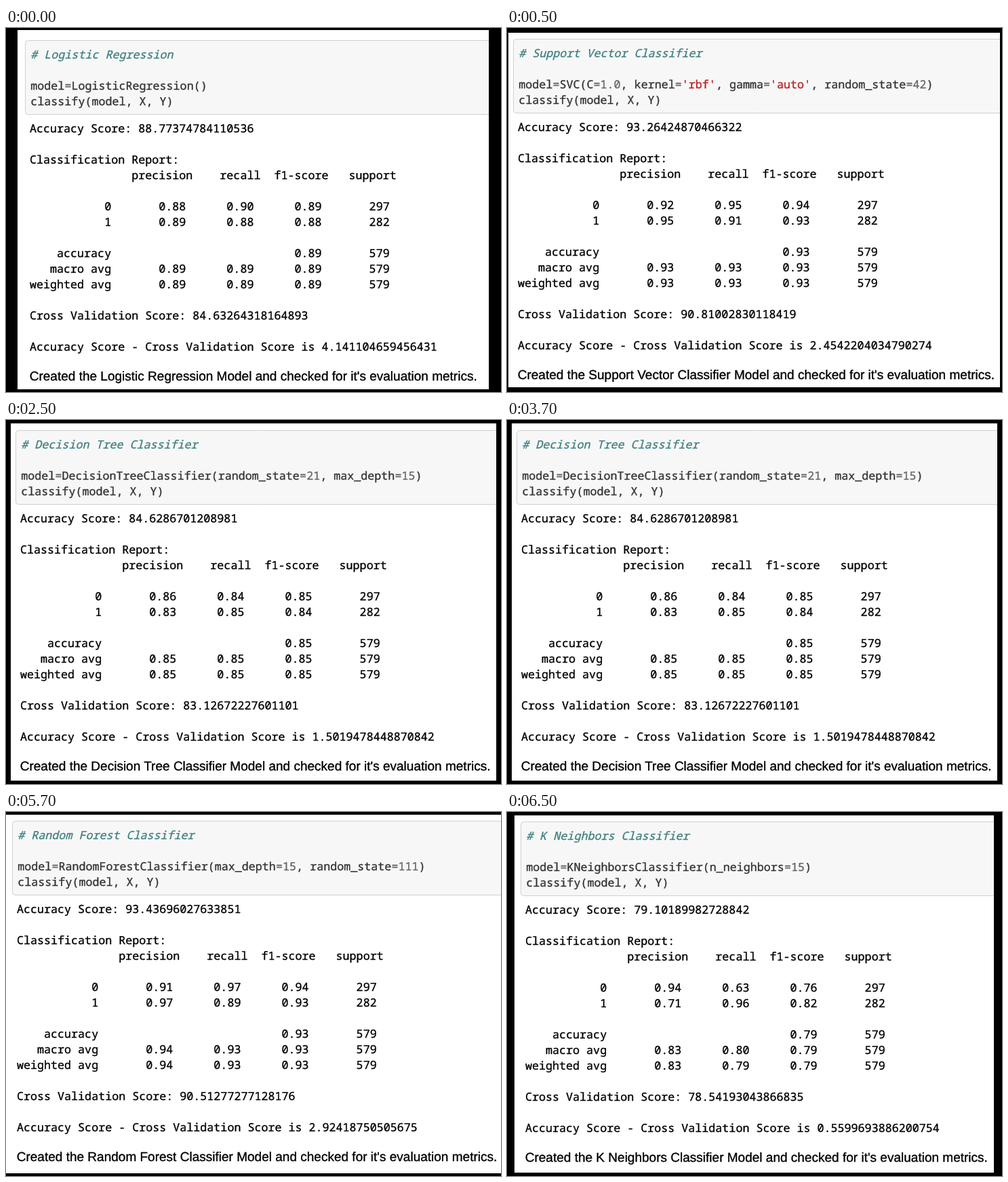
Write an HTML page with a canvas that moves like this. It is 730 px wide and 537 px high and loops after 8 s.

```html
<!DOCTYPE html>
<html lang="en">
<head>
<meta charset="utf-8">
<title>Model comparison</title>
<style>
html, body { margin: 0; width: 100%; height: 100%; overflow: hidden; background: #000; }
canvas { display: block; }
</style>
</head>
<body>
<canvas id="stage" width="730" height="537"></canvas>
<script>
const ctx = document.getElementById('stage').getContext('2d');
const MONO = '16.7px "Noto Sans Mono", "DejaVu Sans Mono", monospace';
const SANS = '19.03px "Liberation Sans", Arial, sans-serif';
const PITCH = 10.02, LINE = 23, LOOP = 8000;

// page: white area [left, top, right, bottom]; x, y: corner of the code cell
// scores: precision, recall, f1 for class 0, class 1, macro and weighted average
const slides = [
  {
    start: 0, page: [17, 3, 712, 533], x: 28, y: 18,
    name: 'Logistic Regression', code: 'LogisticRegression()',
    acc: '88.77374784110536', cross: '84.63264318164893', diff: '4.141104659456431',
    scores: ['0.88 0.90 0.89', '0.89 0.88 0.88', '0.89 0.89 0.89', '0.89 0.89 0.89'], total: '0.89'
  },
  {
    start: 500, page: [2, 7, 727, 530], x: 9, y: 16,
    name: 'Support Vector Classifier',
    code: "SVC(C=1.0, kernel='rbf', gamma='auto', random_state=42)",
    acc: '93.26424870466322', cross: '90.81002830118419', diff: '2.4542204034790274',
    scores: ['0.92 0.95 0.94', '0.95 0.91 0.93', '0.93 0.93 0.93', '0.93 0.93 0.93'], total: '0.93'
  },
  {
    start: 2500, page: [7, 5, 723, 532], x: 14, y: 15,
    name: 'Decision Tree Classifier',
    code: 'DecisionTreeClassifier(random_state=21, max_depth=15)',
    acc: '84.6286701208981', cross: '83.12672227601101', diff: '1.5019478448870842',
    scores: ['0.86 0.84 0.85', '0.83 0.85 0.84', '0.85 0.85 0.85', '0.85 0.85 0.85'], total: '0.85'
  },
  {
    start: 4500, page: [0, 4, 730, 533], x: 9, y: 13,
    name: 'Random Forest Classifier',
    code: 'RandomForestClassifier(max_depth=15, random_state=111)',
    acc: '93.43696027633851', cross: '90.51277277128176', diff: '2.92418750505675',
    scores: ['0.91 0.97 0.94', '0.97 0.89 0.93', '0.94 0.93 0.93', '0.94 0.93 0.93'], total: '0.93'
  },
  {
    start: 6500, page: [11, 5, 718, 532], x: 20, y: 14,
    name: 'K Neighbors Classifier', code: 'KNeighborsClassifier(n_neighbors=15)',
    acc: '79.10189982728842', cross: '78.54193043866835', diff: '0.5599693886200754',
    scores: ['0.94 0.63 0.76', '0.71 0.96 0.82', '0.83 0.80 0.79', '0.83 0.79 0.79'], total: '0.79'
  }
];

// the hairline outline gives the text a slightly heavier weight
function put(text, x, y, color, font = MONO) {
  ctx.font = font;
  ctx.fillStyle = ctx.strokeStyle = color;
  ctx.lineWidth = 0.35;
  ctx.fillText(text, x, y);
  ctx.strokeText(text, x, y);
}

function putCode(code, x, y) {
  for (const part of code.split(/('[^']*'|=|\b\d[\d.]*)/)) {
    const color = part[0] === "'" ? '#ba2121' : /^[=\d]/.test(part) ? '#666' : '#333';
    put(part, x, y, color);
    x += part.length * PITCH;
  }
}

function row(label, cells) {
  return label.padStart(12) + ' ' + cells.map(c => ' ' + c.padStart(9)).join('');
}

function report(s) {
  const line = (label, i, n) => row(label, [...s.scores[i].split(' '), n]);
  return [
    'Accuracy Score: ' + s.acc,
    '',
    'Classification Report:',
    ' ' + row('', ['precision', 'recall', 'f1-score', 'support']),
    '',
    line('0', 0, '297'),
    line('1', 1, '282'),
    '',
    row('accuracy', ['', '', s.total, '579']),
    line('macro avg', 2, '579'),
    line('weighted avg', 3, '579'),
    '',
    'Cross Validation Score: ' + s.cross,
    '',
    'Accuracy Score - Cross Validation Score is ' + s.diff
  ];
}

function draw(s) {
  const [left, top, right, bottom] = s.page;
  ctx.fillStyle = '#000';
  ctx.fillRect(0, 0, 730, 537);
  ctx.save();
  ctx.beginPath();
  ctx.rect(left, top, right - left, bottom - top);
  ctx.clip();
  ctx.fillStyle = '#fff';
  ctx.fillRect(0, 0, 730, 537);

  // the code cell runs past the right edge of the page
  ctx.beginPath();
  ctx.roundRect(s.x + 0.5, s.y + 0.5, 760, 109, 4);
  ctx.fillStyle = '#f7f7f7';
  ctx.fill();
  ctx.strokeStyle = '#cfcfcf';
  ctx.lineWidth = 1;
  ctx.stroke();

  const codeX = s.x + 8.3, outX = s.x + 7;
  put('# ' + s.name, codeX, s.y + 27, '#408080', 'italic ' + MONO);
  putCode('model=' + s.code, codeX, s.y + 73);
  putCode('classify(model, X, Y)', codeX, s.y + 96);

  report(s).forEach((text, i) => put(text, outX, s.y + 136 + i * LINE, '#000'));
  put(`Created the ${s.name} Model and checked for it's evaluation metrics.`,
    s.x + 6.7, s.y + 502, '#000', SANS);
  ctx.restore();
}

function tick() {
  const t = performance.now() % LOOP;
  draw(slides.findLast(s => s.start <= t));
  requestAnimationFrame(tick);
}

ctx.textRendering = 'geometricPrecision';
ctx.lineJoin = 'round';
tick();
</script>
</body>
</html>
```
